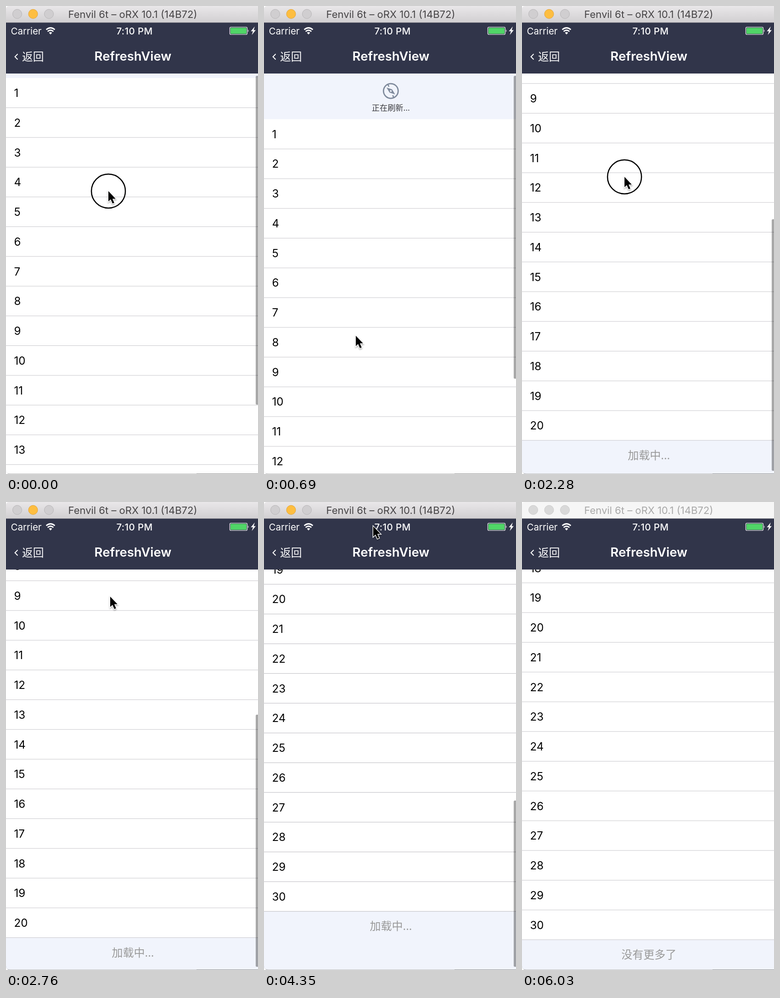
These frames come from a looping animation (549 by 1019 pixels, 6060 ms). An HTML page:

```html
<!DOCTYPE html>
<html lang="zh">
<head>
<meta charset="utf-8">
<title>RefreshView</title>
<style>
  html, body { margin: 0; width: 100%; height: 100%; overflow: hidden; background: #fff; }
  svg { display: block; width: 100vw; height: 100vh; }
  text { font-family: Inter, 'Noto Sans CJK SC', 'Noto Sans CJK', sans-serif; }
  .cjk { font-family: 'Noto Sans CJK SC', 'Noto Sans CJK', sans-serif; }
  .mid { text-anchor: middle; }
</style>
</head>
<body>
<svg id="stage" viewBox="0 0 549 1019" xmlns="http://www.w3.org/2000/svg">
  <defs>
    <linearGradient id="bar" x2="0" y2="1">
      <stop offset="0" stop-color="#e9e7e9"/>
      <stop offset="1" stop-color="#d1cfd1"/>
    </linearGradient>
    <clipPath id="window"><path d="M0 7Q0 0 7 0H549V1018H8Q0 1018 0 1010Z"/></clipPath>
    <filter id="shadow" x="-50%" y="-50%" width="200%" height="200%">
      <feDropShadow dx="0" dy="2" stdDeviation="1.5" flood-opacity=".35"/>
    </filter>
  </defs>
  <path d="M4 1018.5H415" stroke="#c2c2c2"/>
  <path d="M415 1018.5H549" stroke="#8e8e8e"/>
  <path d="M.5 1008Q.5 1018 9 1018" fill="none" stroke="#b4b4b4" stroke-width="1.5"/>
  <g clip-path="url(#window)">
    <rect y="36" width="549" height="983" fill="#f1f4fc"/>
    <g id="list">
      <rect id="sheet" width="549" fill="#fff"/>
      <g id="rows"></g>
      <text id="more" class="cjk mid" x="276.5" font-size="24" fill="#999"></text>
    </g>
    <g id="head">
      <g id="compass" fill="none" stroke="#7f8a9c">
        <circle r="16" stroke-width="2.8"/>
        <path d="M-13.5 -7L-9 -4.8M13.5 7L9 4.8" stroke-width="2.6"/>
        <path d="M-12 0L0 -4.4L12 0L0 4.4Z" fill="#7f8a9c" stroke="none"/>
        <circle r="2" fill="#f1f4fc" stroke="none"/>
      </g>
      <text id="state" class="cjk mid" y="43" font-size="17.2" fill="#3c3c40"></text>
    </g>
    <rect id="thumb" x="544" width="6" rx="2.5" fill="#000"/>

    <rect y="36" width="549" height="111" fill="#31354a"/>
    <g fill="#fff">
      <text x="10.5" y="61.5" font-size="20.5">Carrier</text>
      <text class="mid" x="280" y="61.5" font-size="20.5" font-weight="500" letter-spacing=".4">7:10 PM</text>
      <text class="mid" x="276.5" y="119" font-size="27.5" font-weight="600">RefreshView</text>
      <text class="cjk" x="35" y="118.8" font-size="23.7" font-weight="300">返回</text>
      <path d="M97 62L93.6 58.2Q97 55.4 100.4 58.2Z"/>
      <path d="M542 44.5L533.5 55H538L535.5 63L544 52.5H539.5Z"/>
      <path d="M527.2 51Q529.6 54 527.2 57Z"/>
    </g>
    <g fill="none" stroke="#fff">
      <path d="M90.7 55.5Q97 50 103.3 55.5M87.6 51.6Q97 43.4 106.4 51.6" stroke-width="2.7"/>
      <path d="M25.5 104.5L19.5 110.5L25.5 116.5" stroke-width="1.9"/>
      <rect x="487.5" y="46" width="38" height="16" rx="2.5" stroke-width="1.2"/>
    </g>
    <rect x="489" y="47.5" width="35" height="13" rx="1.2" fill="#50d567"/>

    <rect id="chrome" width="549" height="36"/>
    <path d="M0 35.8H549" stroke="#b9b7b9"/>
    <g id="lights"></g>
    <text id="caption" class="mid" x="276" y="25.7" font-size="22">Fenvil 6t – oRX 10.1 (14B72)</text>
  </g>
  <g id="cursor">
    <circle id="ring" r="37" fill="none" stroke="#000" stroke-width="2.5"/>
    <path d="M0 0V22.5L5 18L9 27L12.8 25.4L8.9 16.6H15.8Z" stroke="#fff" stroke-width="2.6"
      paint-order="stroke" filter="url(#shadow)"/>
  </g>
</svg>
<script>
  const LOOP = 6060, STEP = 30;
  const ROW = 64.75, FOOT = 65, TOP = 147, VIEW = 871;
  const HOLD = 95.25, RUBBER = 0.523, TAU = 115;
  const RELEASE1 = 352, RELEASE2 = 2410, RELEASE3 = 4278;
  const REFRESHED = 1290, LOADED = 3300, ALL_LOADED = 5190, BLUR = 6030;

  // time, x, y of the pointer
  const path = [
    [-59, 224.4, 384.4], [RELEASE1, 200, 718], [1740, 200, 718], [1980, 212, 875],
    [2010, 212, 875], [RELEASE2, 227, 206], [2790, 227, 206], [3700, 178, 921],
    [3930, 178, 921], [RELEASE3, 238, 53], [4750, 238, 53], [5380, 238, 967],
    [5640, 238, 967], [5800, 286, 1030], [LOOP, 286, 1030]
  ];
  const presses = [[0, RELEASE1], [1990, RELEASE2], [3760, RELEASE3]];
  // shown from, fade starts, gone
  const thumbTimes = [[0, 850, 1150], [2010, 3000, 3300], [3931, 4750, 5050]];

  const $ = id => document.getElementById(id);
  const set = (el, attrs) => { for (const k in attrs) el.setAttribute(k, attrs[k]); };
  const add = (parent, tag, attrs) => {
    const el = document.createElementNS('http://www.w3.org/2000/svg', tag);
    set(el, attrs);
    return parent.appendChild(el);
  };
  const clamp = (v, a = 0, b = 1) => Math.min(b, Math.max(a, v));
  const smooth = p => p * p * (3 - 2 * p);
  const within = (t, [a, b]) => t >= a && t < b;

  const rows = Array.from({ length: 30 }, (_, i) => {
    const g = add($('rows'), 'g', { transform: `translate(0 ${i * ROW})` });
    add(g, 'text', { x: 17.5, y: 41.3, 'font-size': 24, fill: '#000' }).textContent = i + 1;
    add(g, 'path', { d: `M0 ${ROW}H549`, stroke: '#c8c7cc', 'stroke-width': 1.1 });
    return g;
  });
  const lights = [24.5, 59, 93.5].map(cx => add($('lights'), 'circle', { cx, cy: 17.3, r: 10 }));

  function pointer(t) {
    const i = path.findIndex((p, n) => n && t <= p[0]);
    const [t0, x0, y0] = path[i - 1], [t1, x1, y1] = path[i];
    const p = smooth((t - t0) / (t1 - t0));
    return { x: x0 + (x1 - x0) * p, y: y0 + (y1 - y0) * p };
  }

  const countAt = t => t < REFRESHED ? 15 : t < LOADED ? 20 : 30;
  const maxScroll = n => n * ROW + FOOT - VIEW;
  const settle = (t, from) => Math.exp(-(t - from) / TAU);
  const stretch = (y, max) => y <= max ? y : max + (y - max) * RUBBER;

  function scrollAt(t) {
    const low = maxScroll(20), high = maxScroll(30);
    const y = pointer(t).y;
    if (t < RELEASE1) return (384.4 - y) * RUBBER;
    if (t < 1560) return -HOLD - ((718 - 384.4) * RUBBER - HOLD) * settle(t, RELEASE1);
    if (t < 2010) return -HOLD * (1 - smooth(clamp((t - 1560) / 300)));
    if (t < RELEASE2) return stretch(875 - y, low);
    if (t < LOADED) return low + (875 - 206 - low) * RUBBER * settle(t, RELEASE2);
    if (t < 3930) return low;
    if (t < RELEASE3) return stretch(low + 921 - y, high);
    return high + (low + 921 - 53 - high) * RUBBER * settle(t, RELEASE3);
  }

  function drawThumb(t, scroll, count) {
    const span = thumbTimes.find(s => t >= s[0] && t < s[2]);
    const alpha = span ? 1 - clamp((t - span[1]) / (span[2] - span[1])) : 0;
    const max = maxScroll(count);
    const over = Math.max(0, -scroll, scroll - max);
    const track = VIEW - 11;
    const height = track * VIEW / (count * ROW + FOOT + over);
    const y = TOP + 5 + (track - height) * clamp(scroll / max);
    set($('thumb'), { y, height, opacity: alpha * 0.34 });
  }

  function drawHead(t, scroll) {
    const pull = Math.max(0, -scroll);
    const y = TOP + pull - 61.25 - Math.max(0, pull - HOLD) * 0.034;
    set($('head'), { transform: `translate(276.3 ${y})` });
    const angle = -45 + (clamp(t, RELEASE1, REFRESHED) - 360) * 0.2527;
    set($('compass'), { transform: `rotate(${angle})` });
    $('state').textContent = t >= REFRESHED ? '刷新成功' : t >= RELEASE1 ? '正在刷新...'
      : pull < HOLD ? '下拉刷新' : '松开刷新';
    set($('head'), { display: pull > 0 ? 'inline' : 'none' });
  }

  function drawChrome(active) {
    set($('chrome'), { fill: active ? 'url(#bar)' : '#f6f6f6' });
    set($('caption'), { fill: active ? '#464446' : '#a9a9a9' });
    lights.forEach((el, i) => {
      const [fill, stroke] = !active ? ['#d9d9d9', '#cacaca']
        : i === 1 ? ['#fdbe41', '#e2a336'] : ['#d0ced0', '#b6b4b6'];
      set(el, { fill, stroke });
    });
  }

  function draw(t) {
    const count = countAt(t), scroll = scrollAt(t), { x, y } = pointer(t);
    set($('list'), { transform: `translate(0 ${TOP - scroll})` });
    set($('sheet'), { height: count * ROW });
    rows.forEach((g, i) => set(g, { display: i < count ? 'inline' : 'none' }));
    set($('more'), { y: count * ROW + 41 });
    $('more').textContent = t < ALL_LOADED ? '加载中...' : '没有更多了';
    drawHead(t, scroll);
    drawThumb(t, scroll, count);
    drawChrome(t < BLUR);
    set($('cursor'), { transform: `translate(${x} ${y})`, display: t < 5800 ? 'inline' : 'none' });
    set($('ring'), { display: presses.some(p => within(t, p)) ? 'inline' : 'none' });
  }

  const start = performance.now();
  function tick() {
    const t = (performance.now() - start) % LOOP;
    draw(Math.floor(t / STEP) * STEP);
    requestAnimationFrame(tick);
  }
  tick();
</script>
</body>
</html>
```
